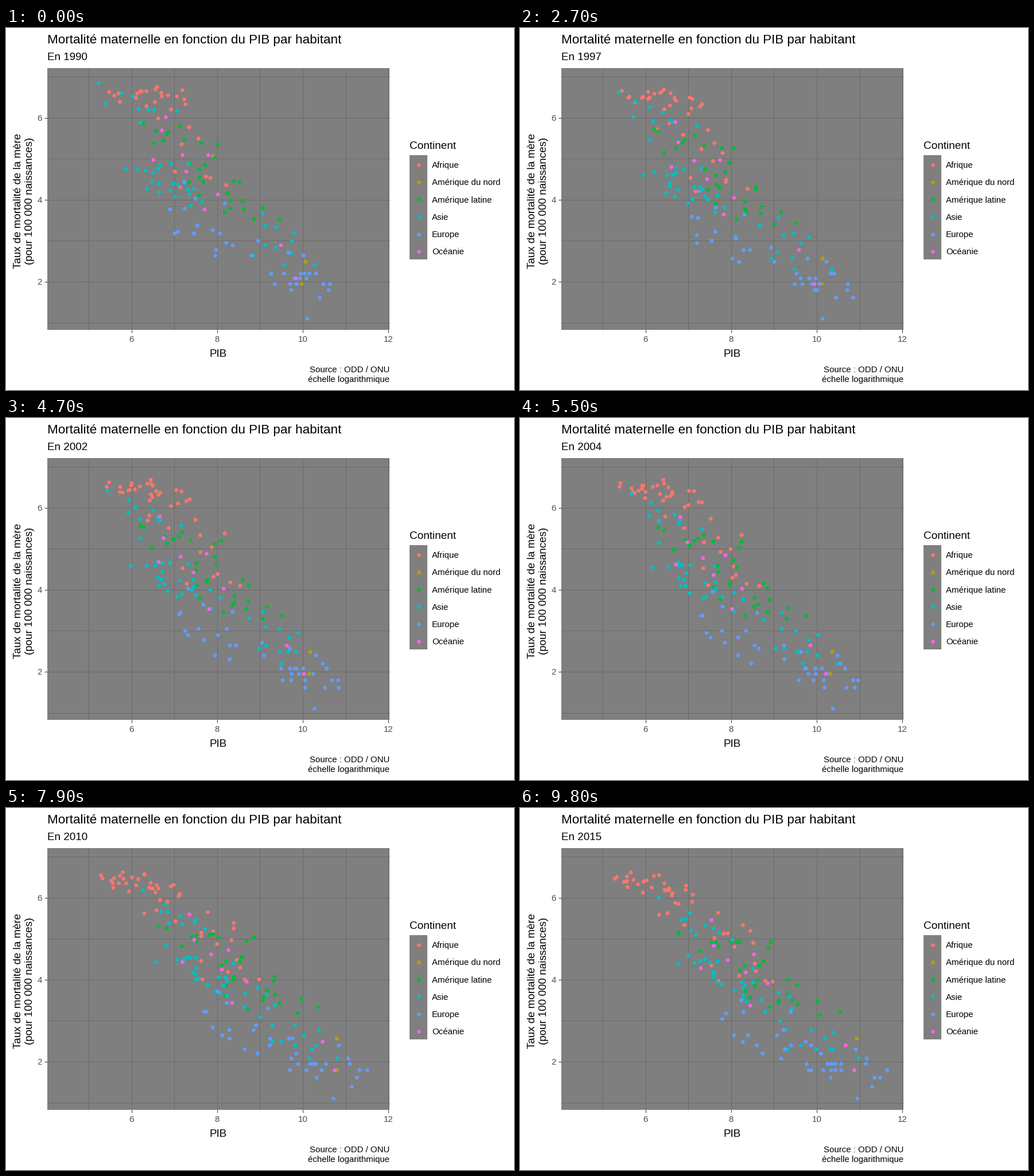
Write a matplotlib script that moves like this. It is 885 by 632 pixels and loops after 10000 ms.

```python
import math

import matplotlib.pyplot as plt
import numpy as np
from matplotlib.animation import FuncAnimation
from matplotlib.patches import Rectangle

W, H, DPI = 885, 632, 100
PX = 72 / DPI                       # one pixel in points
LEFT, RIGHT, TOP, BOTTOM = 72, 668, 70, 527
FIRST_YEAR, LAST_YEAR = 1990, 2015
YEARS = LAST_YEAR - FIRST_YEAR + 1

plt.rcParams["font.family"] = "Liberation Sans"
rng = np.random.default_rng(12)

CONTINENTS = {
    "Afrique": "#F8766D", "Amérique du nord": "#B79F00",
    "Amérique latine": "#00BA38", "Asie": "#00BFC4",
    "Europe": "#619CFF", "Océanie": "#F564E3",
}

# Dots lie along a line that moves from its first place to its last:
# continent, dots, late arrivals, first line, last line, scatter (x, y)
GROUPS = [
    ("Afrique", 20, 8, (190, 108, 312, 128), (168, 115, 300, 155), (12, 10)),
    ("Afrique", 12, 8, (272, 140, 390, 275), (270, 160, 440, 300), (24, 22)),
    ("Amérique du nord", 2, 0, (522, 408, 515, 446), (586, 397, 580, 457), (0, 0)),
    ("Amérique latine", 30, 0, (255, 165, 425, 325), (320, 220, 500, 350), (24, 24)),
    ("Asie", 9, 2, (165, 115, 275, 138), (255, 175, 335, 225), (26, 15)),
    ("Asie", 22, 2, (225, 235, 325, 300), (290, 255, 430, 345), (26, 18)),
    ("Asie", 12, 1, (424, 335, 515, 410), (450, 370, 575, 440), (22, 22)),
    ("Europe", 18, 0, (300, 305, 415, 405), (370, 360, 500, 435), (28, 26)),
    ("Europe", 20, 0, (480, 418, 550, 440), (500, 430, 610, 458), (12, 20)),
    ("Océanie", 8, 0, (262, 165, 345, 280), (335, 220, 395, 300), (22, 20)),
    ("Océanie", 2, 0, (479, 378, 506, 437), (558, 414, 580, 457), (0, 0)),
]


def x_px(value):
    return 218.5 + (value - 6) * 74.65


def y_px(value):
    return 156.5 - (value - 6) * 71.6


def whole_rates(y):
    """Snap heights to the logarithm of whole rates."""
    value = np.clip(6 + (156.5 - y) / 71.6, math.log(3), math.log(980))
    return y_px(np.log(np.round(np.exp(value))))


def along(ends, share):
    x0, y0, x1, y1 = ends
    return np.stack([x0 + (x1 - x0) * share, y0 + (y1 - y0) * share], axis=-1)


def wander(count, step):
    walk = np.cumsum(rng.normal(0, step, (YEARS, count, 2)), axis=0)
    return walk - walk[0]


def build_group(dots, late, first, last, scatter):
    share = np.concatenate([np.linspace(0, 1, dots), rng.uniform(0, 1, late)])
    born = np.concatenate([np.zeros(dots), np.linspace(1, 19, late)]).astype(int)
    # Wealth stands still, then climbs after 2000; mortality falls steadily
    t = np.linspace(0, 1, YEARS)
    rise = np.interp(t, [0, 0.48, 0.8, 1], [0, 0.12, 0.85, 1])
    progress = np.stack([rise, t], axis=-1)[:, None]
    start, end = along(first, share), along(last, share)
    offset = rng.normal(0, 1, start.shape) * scatter
    track = start + (end - start) * progress + offset
    track += wander(len(share), (2.5, 1) if any(scatter) else (1, 0.5))
    x = np.clip(track[..., 0], 98, 640)
    return np.stack([x, whole_rates(track[..., 1])], axis=-1), born


tracks, births, colors = [], [], []
for continent, *rule in GROUPS:
    track, born = build_group(*rule)
    tracks.append(track)
    births.append(born)
    colors += [CONTINENTS[continent]] * len(born)
tracks = np.concatenate(tracks, axis=1)
births = np.concatenate(births)
colors = np.array(colors)

fig = plt.figure(figsize=(W / DPI, H / DPI), dpi=DPI, facecolor="white")
ax = fig.add_axes([0, 0, 1, 1])
ax.set(xlim=(0, W), ylim=(H, 0))
ax.axis("off")


def text(x, y, label, size=15, color="black", ha="left", rotation=0):
    return ax.text(x, y, label, fontsize=size * PX, color=color, ha=ha,
                   va="baseline", rotation=rotation, rotation_mode="anchor")


def line(x0, y0, x1, y1, color):
    ax.plot([x0, x1], [y0, y1], color=color, lw=PX,
            solid_capstyle="butt", zorder=1)


def box(x0, y0, x1, y1):
    ax.add_patch(Rectangle((x0, y0), x1 - x0, y1 - y0, fc="#7F7F7F", lw=0, zorder=0))


def draw_dots(x, y, color):
    return ax.scatter(x, y, s=24, c=color, linewidths=0, zorder=3)


def draw_chart():
    box(LEFT, TOP, RIGHT, BOTTOM)
    for value in range(5, 13):
        line(x_px(value), TOP, x_px(value), BOTTOM, "#6B6B6B")
    for value in range(1, 8):
        line(LEFT, y_px(value), RIGHT, y_px(value), "#6B6B6B")
    for value in (6, 8, 10, 12):
        line(x_px(value), BOTTOM, x_px(value), BOTTOM + 5, "#333333")
        text(x_px(value), 548.5, str(value), color="#4D4D4D", ha="center")
    for value in (2, 4, 6):
        line(LEFT - 5, y_px(value), LEFT, y_px(value), "#333333")
        text(63, y_px(value) + 5.5, str(value), color="#4D4D4D", ha="right")

    text(72, 27.5, "Mortalité maternelle en fonction du PIB par habitant", 22.4)
    text(370, 574.5, "PIB", 18.8, ha="center")
    text(26, 301.5, "Taux de mortalité de la mère", 18.8, ha="center", rotation=90)
    text(46, 301.5, "(pour 100 000 naissances)", 18.8, ha="center", rotation=90)
    text(668, 601, "Source : ODD / ONU", ha="right")
    text(668, 618, "échelle logarithmique", ha="right")

    text(703, 211, "Continent", 19)
    box(703, 222, 734, 404)
    for i, (name, color) in enumerate(CONTINENTS.items()):
        y = 238.5 + 30.25 * i
        draw_dots([718.5], [y], color)
        text(742, y + 5.5, name)


draw_chart()
subtitle = text(72, 56.5, "", 18.8)
points = draw_dots(*tracks[0].T, colors)


def elapsed_years(frame):
    """Each year rests, then passes through one halfway frame."""
    if frame >= 97:
        return 24.5 if frame == 97 else 25
    return frame // 4 + 0.5 if frame % 4 == 2 else (frame + 1) // 4


def update(frame):
    now = elapsed_years(frame)
    before, after = math.floor(now), math.ceil(now)
    alive = births <= before
    points.set_offsets(((tracks[before] + tracks[after]) / 2)[alive])
    points.set_facecolors(colors[alive])
    subtitle.set_text(f"En {FIRST_YEAR + after}")
    return points, subtitle


anim = FuncAnimation(fig, update, frames=100, interval=100, repeat=True,
                     repeat_delay=0, blit=False)
plt.show()
```
